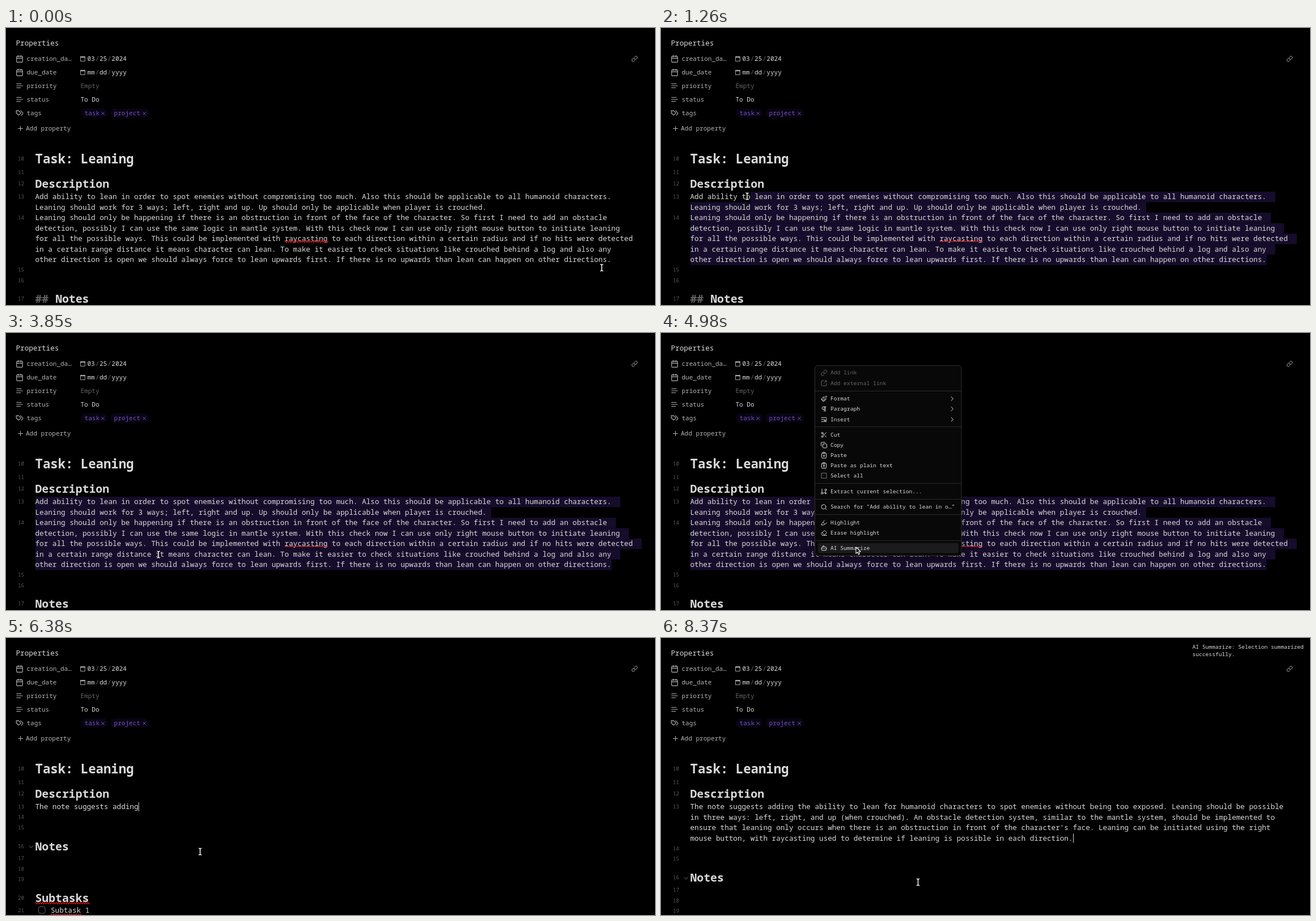
Write an HTML page that moves like this. It is 1145 px wide and 489 px high and loops after 8450 ms.

```html
<!DOCTYPE html>
<html lang="en">
<head>
<meta charset="utf-8">
<title>Summarize a note</title>
<style>
  html, body { margin: 0; width: 100%; height: 100%; overflow: hidden; background: #000; }
  svg { display: block; width: 1145px; height: 489px; }
  text { font-family: "Noto Sans Mono", "DejaVu Sans Mono", monospace; white-space: pre; }
  .icon { fill: none; stroke-linecap: round; stroke-linejoin: round; stroke-width: 2; }
</style>
</head>
<body>
<svg id="stage" viewBox="0 0 1145 489">
  <g id="selection"></g>
  <g id="page"></g>
  <g id="doc"></g>
  <g id="menu"></g>
  <g id="mouse"></g>
</svg>
<script>
const LOOP = 8450, STEP = 77.5;
const LEFT = 51.5, TOP = 289, ROW = 18.5, CHAR = 7.59, HEAD_CHAR = 11.88;
const SIZE = { body: 12.65, h1: 22.3, h2: 19.8, prop: 11.03, num: 9.2, menu: 9.65 };
const INK = '#dadada', MUTED = '#b3b3b3', FAINT = '#666', PURPLE = '#7350c0';

const before = [
  'Add ability to lean in order to spot enemies without compromising too much. Also this should be applicable to all humanoid characters.',
  'Leaning should work for 3 ways; left, right and up. Up should only be applicable when player is crouched.',
  'Leaning should only be happening if there is an obstruction in front of the face of the character. So first I need to add an obstacle',
  'detection, possibly I can use the same logic in mantle system. With this check now I can use only right mouse button to initiate leaning',
  'for all the possible ways. This could be implemented with raycasting to each direction within a certain radius and if no hits were detected',
  'in a certain range distance it means character can lean. To make it easier to check situations like crouched behind a log and also any',
  'other direction is open we should always force to lean upwards first. If there is no upwards than lean can happen on other directions.'
];
const rowTail = [2, 1, 2, 2, 2, 2, 0]; // wrapped space and line break
const summary = [
  'The note suggests adding the ability to lean for humanoid characters to spot enemies without being too exposed. Leaning should be possible',
  'in three ways: left, right, and up (when crouched). An obstacle detection system, similar to the mantle system, should be implemented to',
  "ensure that leaning only occurs when there is an obstruction in front of the character's face. Leaning can be initiated using the right",
  'mouse button, with raycasting used to determine if leaning is possible in each direction.'
];

const icons = {
  calendar: 'M5 4h14a2 2 0 0 1 2 2v14a2 2 0 0 1-2 2H5a2 2 0 0 1-2-2V6a2 2 0 0 1 2-2zM16 2v4M8 2v4M3 10h18',
  text: 'M17 6H3M21 12H3M15 18H3',
  tags: 'M9 5H2v7l6.3 6.3a1 1 0 0 0 1.4 0l5.6-5.6a1 1 0 0 0 0-1.4zM6 9h.01M15 5l6.3 6.3a2.4 2.4 0 0 1 0 3.4L17 19',
  plus: 'M12 4v16M4 12h16',
  link: 'M10 13a5 5 0 0 0 7.54.54l3-3a5 5 0 0 0-7.07-7.07l-1.72 1.71M14 11a5 5 0 0 0-7.54-.54l-3 3a5 5 0 0 0 7.07 7.07l1.71-1.71',
  external: 'M21 13v6a2 2 0 0 1-2 2H5a2 2 0 0 1-2-2V5a2 2 0 0 1 2-2h6M21 3l-9 9M15 3h6v6',
  brush: 'M18.4 2.6L14 7l-1.6-1.6a2 2 0 0 0-2.8 0L8 7l9 9 1.6-1.6a2 2 0 0 0 0-2.8L17 10l4.4-4.4a2 2 0 0 0-3-3zM9 8c-2 3-4 3.5-7 4l8 10c2-1 6-5 6-7M14.5 17.5L4.5 15',
  pilcrow: 'M13 4v16M17 4v16M19 4H9.5a4.5 4.5 0 0 0 0 9H13',
  insert: 'M21 5H3M21 19H3M3 12h10M21 9v6h-7M16 12l-3 3 3 3',
  scissors: 'M9 6a3 3 0 1 1-6 0 3 3 0 0 1 6 0zM9 18a3 3 0 1 1-6 0 3 3 0 0 1 6 0zM20 4L8.1 15.9M14.5 14.5L20 20M8.1 8.1L12 12',
  copy: 'M10 8h10a2 2 0 0 1 2 2v10a2 2 0 0 1-2 2H10a2 2 0 0 1-2-2V10a2 2 0 0 1 2-2zM4 16a2 2 0 0 1-2-2V4a2 2 0 0 1 2-2h10a2 2 0 0 1 2 2',
  paste: 'M9 2h6v4H9zM9 4H6a2 2 0 0 0-2 2v14a2 2 0 0 0 2 2h12a2 2 0 0 0 2-2V6a2 2 0 0 0-2-2h-3M9 14h6M12 11v6',
  plain: 'M9 2h6v4H9zM9 4H6a2 2 0 0 0-2 2v14a2 2 0 0 0 2 2h12a2 2 0 0 0 2-2V6a2 2 0 0 0-2-2h-3M9 12v-1h6v1M12 11v6M11 17h2',
  box: 'M5 3a2 2 0 0 0-2 2M19 3a2 2 0 0 1 2 2M21 19a2 2 0 0 1-2 2M5 21a2 2 0 0 1-2-2M9 3h1M14 3h1M9 21h1M14 21h1M3 9v1M3 14v1M21 9v1M21 14v1',
  branch: 'M5 3v12M8 18a3 3 0 1 1-6 0 3 3 0 0 1 6 0zM21 6a3 3 0 1 1-6 0 3 3 0 0 1 6 0zM18 9a9 9 0 0 1-9 9M18 15v6M21 18h-6',
  search: 'M19 11a8 8 0 1 1-16 0 8 8 0 0 1 16 0zM21 21l-4.3-4.3',
  marker: 'M9 11l-6 6v3h9l3-3M22 12l-4.6 4.6a2 2 0 0 1-2.8 0l-5.2-5.2a2 2 0 0 1 0-2.8L14 4',
  eraser: 'M7 21l-4.3-4.3a2 2 0 0 1 0-2.8l9.6-9.6a2 2 0 0 1 2.8 0l5.6 5.6a2 2 0 0 1 0 2.8L13 21M22 21H7M5 11l9 9',
  bot: 'M12 8V4H8M6 8h12a2 2 0 0 1 2 2v8a2 2 0 0 1-2 2H6a2 2 0 0 1-2-2v-8a2 2 0 0 1 2-2zM2 14h2M20 14h2M15 13v2M9 13v2',
  right: 'M9 5l7 7-7 7',
  down: 'M5 9l7 7 7-7',
  cross: 'M5 5l14 14M19 5L5 19'
};

const label = (s, x, y, size, fill = INK, extra = '') =>
  `<text x="${x}" y="${y}" font-size="${size}" fill="${fill}" ${extra}>${s}</text>`;
const rect = (x, y, w, h, fill, extra = '') =>
  `<rect x="${x}" y="${y}" width="${w}" height="${h}" fill="${fill}" ${extra}/>`;
// An icon centred on cx, cy
const icon = (name, cx, cy, size, color) =>
  `<path class="icon" d="${icons[name]}" stroke="${color}" transform="translate(${cx - size / 2} ${cy - size / 2}) scale(${size / 24})"/>`;
const lineNo = (n, cy) => label(n, 32, cy + 3.2, SIZE.num, '#585858', 'text-anchor="end"');
const heading = (s, cy, x = LEFT, fill = INK) => label(s, x, cy + 7, SIZE.h2, fill, 'font-weight="600"');
const bodyRow = (s, i) => label(s, LEFT, 302 + ROW * i, SIZE.body);
const caret = (x, y) => rect(x, y, 1, 16, INK);
const fold = cy => icon('down', 44.3, cy + 1, 11, '#858585');

function squiggle(x, y, width) {
  let d = `M${x} ${y}q1 -3 2 0`;
  for (let i = 2; i < width; i += 2) d += 't2 0';
  return `<path d="${d}" fill="none" stroke="#e01b1b" stroke-width="1.2"/>`;
}

function buildPage() {
  const keys = [['calendar', 'creation_da…', 54.5], ['calendar', 'due_date', 78.5],
    ['text', 'priority', 102], ['text', 'status', 126], ['tags', 'tags', 150]];
  let out = label('Properties', 17.5, 31.3, SIZE.body);
  for (const [name, key, cy] of keys)
    out += icon(name, 24, cy, 14, MUTED) + label(key, 36.5, cy + 3.8, SIZE.prop, MUTED);

  [['03', '25', '2024'], ['mm', 'dd', 'yyyy']].forEach((parts, i) => {
    const cy = 54.5 + 24 * i;
    out += rect(131.6, cy - 3.6, 7.6, 7.6, 'none', `stroke="${MUTED}" stroke-width=".9"`)
      + rect(131.2, cy - 4.2, 8.4, 2, MUTED);
    parts.forEach((p, j) => {
      out += label(p, 143.5 + 21.4 * j, cy + 3.8, SIZE.prop);
      if (j) out += label('/', 136.4 + 21.4 * j, cy + 3.8, SIZE.prop, FAINT);
    });
  });
  out += label('Empty', 131.5, 105.8, SIZE.prop, FAINT) + label('To Do', 131.5, 129.8, SIZE.prop);

  for (const [name, x, w] of [['task', 132, 47], ['project', 184, 68]])
    out += rect(x, 142, w, 16, '#090414', 'rx="8"')
      + label(name, x + 6.6, 153.5, SIZE.prop, PURPLE)
      + icon('cross', x + w - 8, 150.8, 8.5, '#9878e0');

  out += icon('plus', 25.5, 177.5, 12, MUTED) + label('Add property', 35, 181, SIZE.prop, MUTED)
    + icon('link', 1109, 54.5, 11.5, MUTED)
    + label('Task: Leaning', LEFT, 239, SIZE.h1, INK, 'font-weight="600"')
    + heading('Description', 275.3);
  [230.5, 254.5, 275, 297.5].forEach((cy, i) => out += lineNo(10 + i, cy));
  return out;
}

function buildMenu() {
  const items = [
    ['link', 'Add link', 70], ['external', 'Add external link', 88.5],
    ['brush', 'Format', 116], ['pilcrow', 'Paragraph', 134], ['insert', 'Insert', 152.5],
    ['scissors', 'Cut', 179.5], ['copy', 'Copy', 197.5], ['paste', 'Paste', 215.5],
    ['plain', 'Paste as plain text', 233.5], ['box', 'Select all', 251.5],
    ['branch', 'Extract current selection...', 279.5],
    ['search', 'Search for “Add ability to lean in o…”', 307],
    ['marker', 'Highlight', 334.5], ['eraser', 'Erase highlight', 352.5], ['bot', 'AI Summarize', 379.5]
  ];
  let out = rect(271.5, 57.5, 258.5, 335.5, '#080808',
    'rx="5" stroke="#303030" style="filter:drop-shadow(0 4px 8px rgba(0,0,0,.45))"');
  out += rect(277, 371, 248, 17.5, '#1b1b1b', 'id="hover" rx="3"');
  for (const y of [102, 165, 265, 293, 320, 366]) out += rect(272, y, 258, 1, '#2a2a2a');
  items.forEach(([name, s, cy], i) => {
    const off = i < 2;
    out += icon(name, 287.5, cy + .3, 12, off ? FAINT : INK)
      + label(s, 299, cy + 3.3, SIZE.menu, off ? FAINT : INK);
    if (i > 1 && i < 5) out += icon('right', 513.5, cy, 12, INK);
  });
  return out;
}

// Mouse moves: start time, number of steps, end point
const moves = [
  [80, 5, 1070, 414], [630, 9, 152, 297], [1340, 2, 62, 276], [1500, 6, 58, 294],
  [2390, 1, 57, 293], [2470, 2, 58, 294], [3530, 3, 269, 391],
  [4420, 5, 344, 378], [5560, 1, 342.5, 377], [7970, 1, 453.5, 431]
];
const stepsSince = (t, start) => Math.floor((t - start) / STEP);

function mouseAt(t) {
  let x = 1051, y = 423;
  for (const [start, n, toX, toY] of moves) {
    if (t < start) break;
    const p = Math.min(1, (stepsSince(t, start) + 1) / n);
    x += (toX - x) * p;
    y += (toY - y) * p;
  }
  return { x, y };
}

function selectionHead(t, mouse) {
  if (t >= 2700) return { row: 0, col: t < 3280 ? 1 : 0 };
  const row = Math.max(-1, Math.min(6, Math.floor((mouse.y - TOP) / ROW)));
  const len = row < 0 ? 11 : before[row].length;
  const col = Math.round((mouse.x + 3 - LEFT) / (row < 0 ? HEAD_CHAR : CHAR));
  return { row, col: Math.max(0, Math.min(len, col)) };
}

function drawSelection(t, mouse) {
  if (t < 630 || t >= 6380) return '';
  const head = selectionHead(t, mouse), fill = '#160c2b';
  let out = '';
  if (head.row < 0)
    out += rect(LEFT + head.col * HEAD_CHAR, 264, (12 - head.col) * HEAD_CHAR, 25, fill);
  for (let i = Math.max(0, head.row); i < 7; i++) {
    const from = i === head.row ? head.col : 0;
    out += rect(LEFT + from * CHAR, TOP + ROW * i, (before[i].length + rowTail[i] - from) * CHAR, ROW, fill);
  }
  return out;
}

function wordCount(t) {
  return Math.floor(t < 7100
    ? 4 + 24 * Math.min(7, stepsSince(t, 6380)) / 7
    : 28 + 27 * (stepsSince(t, 7100) + 1) / 8);
}

function typedRows(t) {
  let left = wordCount(t);
  const rows = [];
  for (const line of summary) {
    if (left <= 0) break;
    const words = line.split(' ');
    rows.push(words.slice(0, left).join(' '));
    left -= words.length;
  }
  return rows;
}

function drawBefore(t, mouse) {
  let out = before.map(bodyRow).join('');
  // The spelling mark flattens inside a selection
  out += t < 630 ? squiggle(491.7, 377, 76) : rect(491.7, 376, 76, 1.3, '#e01b1b');
  [334.5, 427, 445.5, 478].forEach((cy, i) => out += lineNo(14 + i, cy));
  out += t < 2700
    ? heading('##', 478.3, LEFT, FAINT) + heading('Notes', 478.3, LEFT + 3 * HEAD_CHAR)
    : heading('Notes', 478.3);
  if (t >= 1340 && mouse.y < TOP) out += fold(275);
  if (t >= 160 && t < 630) out += caret(146, 470);
  if (t >= 2540 && t < 3120) out += caret(59, 290);
  if ([[3280, 3850], [4420, 4980], [5560, 6220]].some(([a, b]) => t >= a && t < b)) out += caret(51, 290);
  return out;
}

function drawAfter(t, rows) {
  const n = rows.length, base = 297.5 + ROW * n, notes = base + 51.5;
  let out = rows.map(bodyRow).join('');
  [base, base + ROW, notes, notes + 21.7, notes + 40.3, notes + 58.7, notes + 91.3, notes + 113]
    .forEach((cy, i) => out += lineNo(14 + i, cy));
  out += heading('Notes', notes + .3) + heading('Subtasks', notes + 91.8)
    + squiggle(LEFT, notes + 100.5, 95)
    + rect(57.5, notes + 107, 11.5, 11.5, 'none', 'rx="2.5" stroke="#666"')
    + label('Subtask 1', 79, notes + 117.5, SIZE.body) + squiggle(79, notes + 121, 53);
  if (n !== 3) out += fold(notes);
  out += caret(LEFT + rows[n - 1].length * CHAR, 290 + ROW * (n - 1));
  if (t >= 8370)
    out += label('AI Summarize: Selection summarized', 937.5, 19.3, SIZE.menu)
      + label('successfully.', 937.5, 31.6, SIZE.menu);
  return out;
}

const beam = 'M-2.6 -5.8Q0 -5.8 0 -4.4Q0 -5.8 2.6 -5.8M0 -4.4V4.4M-2.6 5.8Q0 5.8 0 4.4Q0 5.8 2.6 5.8';
const arrow = 'M0 0V11.2L2.6 8.8L4.5 13L6.5 12.1L4.6 8H8.2Z';

function drawMouse(mouse, pointing) {
  const shape = pointing
    ? `<path d="${arrow}" fill="#000" stroke="#fff" stroke-width="1.1" stroke-linejoin="round"/>`
    : `<path d="${beam}" fill="none" stroke="#000" stroke-width="3"/><path d="${beam}" fill="none" stroke="#fff" stroke-width="1.5"/>`;
  return `<g transform="translate(${mouse.x} ${mouse.y})">${shape}</g>`;
}

const layer = id => document.getElementById(id);
const drawn = {};
function paint(id, markup) {
  if (drawn[id] === markup) return;
  layer(id).innerHTML = drawn[id] = markup;
}

function render(t) {
  const mouse = mouseAt(t);
  const rows = t >= 6380 ? typedRows(t) : null;
  const open = t >= 4010 && t < 5470;
  paint('selection', drawSelection(t, mouse));
  paint('doc', rows ? drawAfter(t, rows) : drawBefore(t, mouse));
  layer('menu').style.display = open ? '' : 'none';
  layer('hover').style.display = mouse.x > 277 && mouse.y < 388.5 ? '' : 'none';
  // The pointer drops out while the third row is being written
  paint('mouse', rows && rows.length === 3 ? '' : drawMouse(mouse, t >= 4010 && t < 5560));
}

paint('page', buildPage());
paint('menu', buildMenu());
const begin = performance.now();
function tick() {
  render((performance.now() - begin) % LOOP);
  requestAnimationFrame(tick);
}
tick();
</script>
</body>
</html>
```
